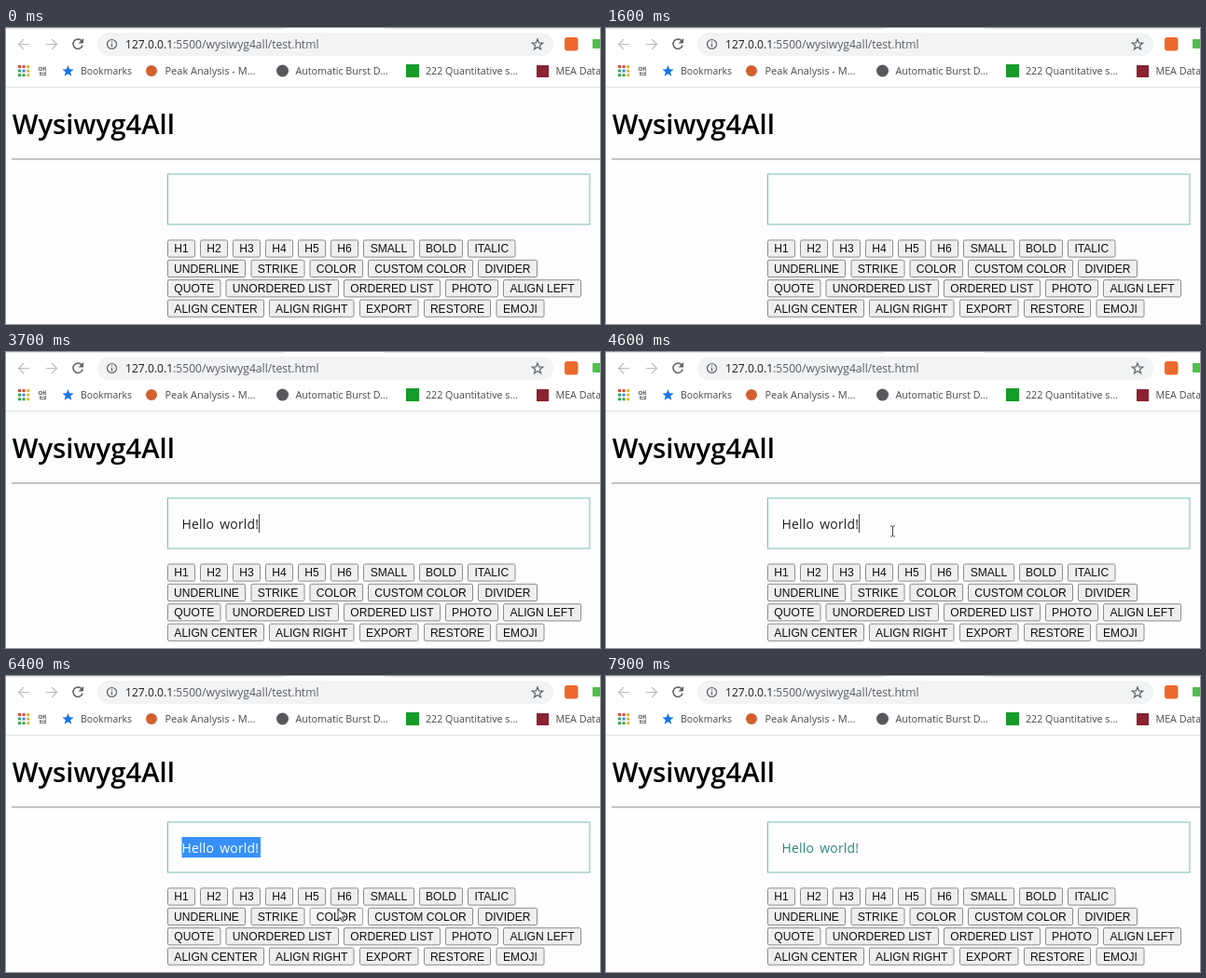
An HTML page that plays this animation: 637 px wide and 318 px high, repeating every 8000 ms.

```html
<!DOCTYPE html>
<html lang="en">
<head>
<meta charset="utf-8">
<title>Editor demo</title>
<style>
  html, body { margin: 0; width: 100%; height: 100%; overflow: hidden; background: #fefcfe; }
  svg { display: block; width: 637px; height: 318px; }
  text { font-family: "Open Sans", "Noto Sans", sans-serif; white-space: pre; }
  .tab { font-size: 10.7px; fill: #46494d; }
  .url { font-size: 12.1px; fill: #5a5e63; }
  .line { fill: none; stroke-width: 1.5; }
  .thin { fill: none; stroke: #b9bbbe; stroke-width: 1.2; }
  .btn rect { fill: #efefef; stroke: #8c8c8c; }
  .btn text { font: 12.1px "Liberation Sans", Arial, sans-serif; text-anchor: middle; fill: #111; }
  .btn.hover rect { fill: #e2e2e2; stroke: #6c6c6c; }
  .btn.press rect { fill: #f6f6f6; stroke: #a0a0a0; }
  .typed { font-size: 14px; letter-spacing: .16px; word-spacing: 2.4px; }
</style>
</head>
<body>
<svg viewBox="0 0 637 318">
  <defs><clipPath id="clip"><rect id="clipBox" y="173" height="22"/></clipPath></defs>

  <!-- browser bars -->
  <rect width="637" height="63" fill="#fff"/>
  <path d="M0 .5H298M406 .5H637" stroke="#dfe1e5"/>
  <path d="M0 63.5H637" stroke="#dedfe2"/>
  <rect x="98" y="5" width="489" height="25" rx="12.5" fill="#f1f3f4"/>
  <path class="thin" d="M25 17.5H14M19 12l-5.5 5.5L19 23"/>
  <path class="thin" d="M43 17.5H54M49 12l5.5 5.5L49 23"/>
  <path class="line" d="M81.3 14A5.2 5.2 0 1 0 82.2 18.5" stroke="#5f6368"/>
  <path d="M83 11v5.5h-5.5z" fill="#5f6368"/>
  <circle class="line" cx="113.5" cy="17.5" r="5" stroke="#5f6368" style="stroke-width:1.2"/>
  <path d="M113.5 16.8v3.6M113.5 14.3v1.3" stroke="#5f6368" stroke-width="1.3"/>
  <text class="url" x="128" y="22"><tspan fill="#202124">127.0.0.1</tspan>:5500/wysiwyg4all/test.html</text>
  <path id="rateStar" fill="none" stroke="#5f6368" stroke-width="1.2"/>
  <rect x="599" y="10" width="14.5" height="14.5" rx="3" fill="#ec682c"/>
  <rect x="629" y="12" width="10" height="10" rx="1" fill="#4fbf4b"/>

  <!-- bookmarks -->
  <g id="apps"></g>
  <text class="tab" x="34" y="50" style="font-family:'Noto Sans CJK KR','Noto Sans CJK',sans-serif">앱</text>
  <path id="markStar" fill="#1a73e8"/>
  <text class="tab" x="80" y="50" style="font-size:10.4px">Bookmarks</text>
  <circle cx="156" cy="46" r="6" fill="#d2602c"/>
  <text class="tab" x="170.5" y="50" style="font-size:11px">Peak Analysis - M...</text>
  <circle cx="296.5" cy="46" r="6.5" fill="#58585c"/>
  <text class="tab" x="310.5" y="50">Automatic Burst D...</text>
  <rect x="429" y="39" width="14" height="14" fill="#159b28"/>
  <text class="tab" x="450" y="50">222 Quantitative s...</text>
  <rect x="569" y="40" width="13" height="13" fill="#8a2231"/>
  <text class="tab" x="589.5" y="50">MEA Data</text>

  <!-- page -->
  <text x="6.7" y="113.5" font-size="29.3" font-weight="600">Wysiwyg4All</text>
  <path d="M6 140.5H637" stroke="#bab9bc"/>
  <path d="M6 141.5H637" stroke="#cccbce"/>
  <rect x="173.5" y="157" width="452.5" height="54" fill="#fefdfe" stroke="#74bfb3"/>
  <g id="buttons"></g>
  <text class="typed" id="copy" x="188.5" y="190"></text>
  <rect id="mark" y="173" height="22" fill="#3690f8"/>
  <text class="typed" id="marked" x="188.5" y="190" fill="#fff" clip-path="url(#clip)">Hello world!</text>
  <path id="caret" d="M0 174V194" stroke="#444"/>
  <path id="beam" d="M-2.5 -5.5H-.8L0 -5L.8 -5.5H2.5M0 -5V5M-2.5 5.5H-.8L0 5L.8 5.5H2.5" fill="none" stroke="#444"/>
  <path id="arrow" d="M0 0V12L2.8 9.5L4.8 13.7L6.6 12.9L4.7 8.8H8.4Z" fill="#fff" stroke="#222" stroke-width=".9"/>
</svg>
<script>
const $ = id => document.getElementById(id);
const LOOP = 8000, STEP = 100;
const TEXT = "Hello world!", LEFT = 188.5, RIGHT = 273;

function make(tag, attrs, parent) {
  const el = document.createElementNS("http://www.w3.org/2000/svg", tag);
  for (const k in attrs) el.setAttribute(k, attrs[k]);
  return parent.appendChild(el);
}

function star(cx, cy, r) {
  const pts = Array.from({ length: 10 }, (_, i) => {
    const a = i * Math.PI / 5 - Math.PI / 2, d = i % 2 ? r * .43 : r;
    return (cx + d * Math.cos(a)).toFixed(2) + " " + (cy + d * Math.sin(a)).toFixed(2);
  });
  return "M" + pts.join("L") + "Z";
}
$("rateStar").setAttribute("d", star(570, 18, 6));
$("markStar").setAttribute("d", star(66.5, 46.5, 6.5));

["#e04a3f", "#e04a3f", "#e9b52c", "#37a457", "#4285f4", "#e9b52c", "#37a457", "#37a457", "#e9b52c"]
  .forEach((fill, i) => make("rect", {
    x: 13 + i % 3 * 4.6, y: 40 + Math.floor(i / 3) * 4.6, width: 3, height: 3, fill
  }, $("apps")));

// label, left, right
const rows = [
  [["H1", 173, 203], ["H2", 208, 238], ["H3", 243, 273], ["H4", 278, 308], ["H5", 313, 343],
   ["H6", 348, 378], ["SMALL", 383, 438], ["BOLD", 443, 490], ["ITALIC", 495, 546.5]],
  [["UNDERLINE", 173, 257], ["STRIKE", 262.5, 320.5], ["COLOR", 325.5, 383],
   ["CUSTOM COLOR", 388, 501], ["DIVIDER", 506, 570]],
  [["QUOTE", 173, 230.5], ["UNORDERED LIST", 235.5, 357], ["ORDERED LIST", 362, 466],
   ["PHOTO", 471, 528], ["ALIGN LEFT", 533, 617]],
  [["ALIGN CENTER", 173, 277], ["ALIGN RIGHT", 282, 373.5], ["EXPORT", 379, 442.5],
   ["RESTORE", 448, 520], ["EMOJI", 525.5, 577.5]]
];
const buttons = [];
rows.forEach((row, r) => row.forEach(([label, x1, x2]) => {
  const y = 227.9 + r * 21.4, el = make("g", { class: "btn" }, $("buttons"));
  make("rect", { x: x1 + .5, y, width: x2 - x1 - 1, height: 18.2, rx: 1.6 }, el);
  make("text", { x: (x1 + x2) / 2, y: y + 13.5 }, el).textContent = label;
  buttons.push({ el, x1, x2, y });
}));

// time, characters shown
const typing = [[2000, 1], [2100, 2], [2200, 3], [2300, 4], [2400, 5], [2500, 6], [2600, 7],
  [2700, 8], [2900, 9], [3000, 10], [3100, 11], [3300, 12]];
// time, x, y
const path = [[4300, 330, 206], [4600, 307.5, 192.5], [4700, 273, 187], [5000, 189, 187],
  [5100, 196, 218], [5400, 258, 294], [5500, 260, 297], [5700, 262, 298], [6000, 312, 276],
  [6300, 354, 252], [6400, 356, 250], [6700, 358, 251], [7100, 645, 214]];
const CLICK = 6500, RELEASE = 6700;

function pointer(t) {
  const i = path.findIndex(p => p[0] > t);
  if (i < 1) return null;
  const [t0, x0, y0] = path[i - 1], [t1, x1, y1] = path[i], k = (t - t0) / (t1 - t0);
  return { x: x0 + (x1 - x0) * k, y: y0 + (y1 - y0) * k };
}

function show(el, on) { el.style.display = on ? "" : "none"; }

function draw(t) {
  const count = typing.filter(k => k[0] <= t).length;
  const copy = $("copy"), p = pointer(t);
  copy.textContent = TEXT.slice(0, count);
  copy.setAttribute("fill", t >= CLICK ? "#2b8979" : "#222");

  const selecting = t > 4700 && t < RELEASE;
  const from = t < 5000 && p ? p.x : LEFT;
  for (const box of [$("mark"), $("clipBox")]) {
    box.setAttribute("x", from);
    box.setAttribute("width", Math.max(0, RIGHT - from));
  }
  show($("mark"), selecting);
  show($("marked"), selecting);

  const lastKey = count ? typing[count - 1][0] : 1800;
  const lit = Math.floor((t - lastKey) / 530) % 2 === 0;
  const end = count ? copy.getComputedTextLength() : 0;
  show($("caret"), t >= 1800 && t <= 4700 && lit);
  $("caret").setAttribute("transform", `translate(${Math.round(LEFT + end) + .5} 0)`);

  const inBox = p && p.y > 157 && p.y < 211 && p.x > 173 && p.x < 626;
  show($("beam"), inBox);
  show($("arrow"), p && !inBox);
  if (p) for (const id of ["beam", "arrow"])
    $(id).setAttribute("transform", `translate(${p.x} ${p.y})`);

  for (const b of buttons) {
    const over = p && p.x > b.x1 && p.x < b.x2 && p.y > b.y && p.y < b.y + 18.2;
    const down = over && t >= 6400 && t < 6600;
    b.el.setAttribute("class", "btn" + (down ? " press" : over ? " hover" : ""));
  }
}

const start = performance.now();
function tick() {
  const t = (performance.now() - start) % LOOP;
  draw(Math.floor(t / STEP) * STEP);
  requestAnimationFrame(tick);
}
tick();
</script>
</body>
</html>
```
